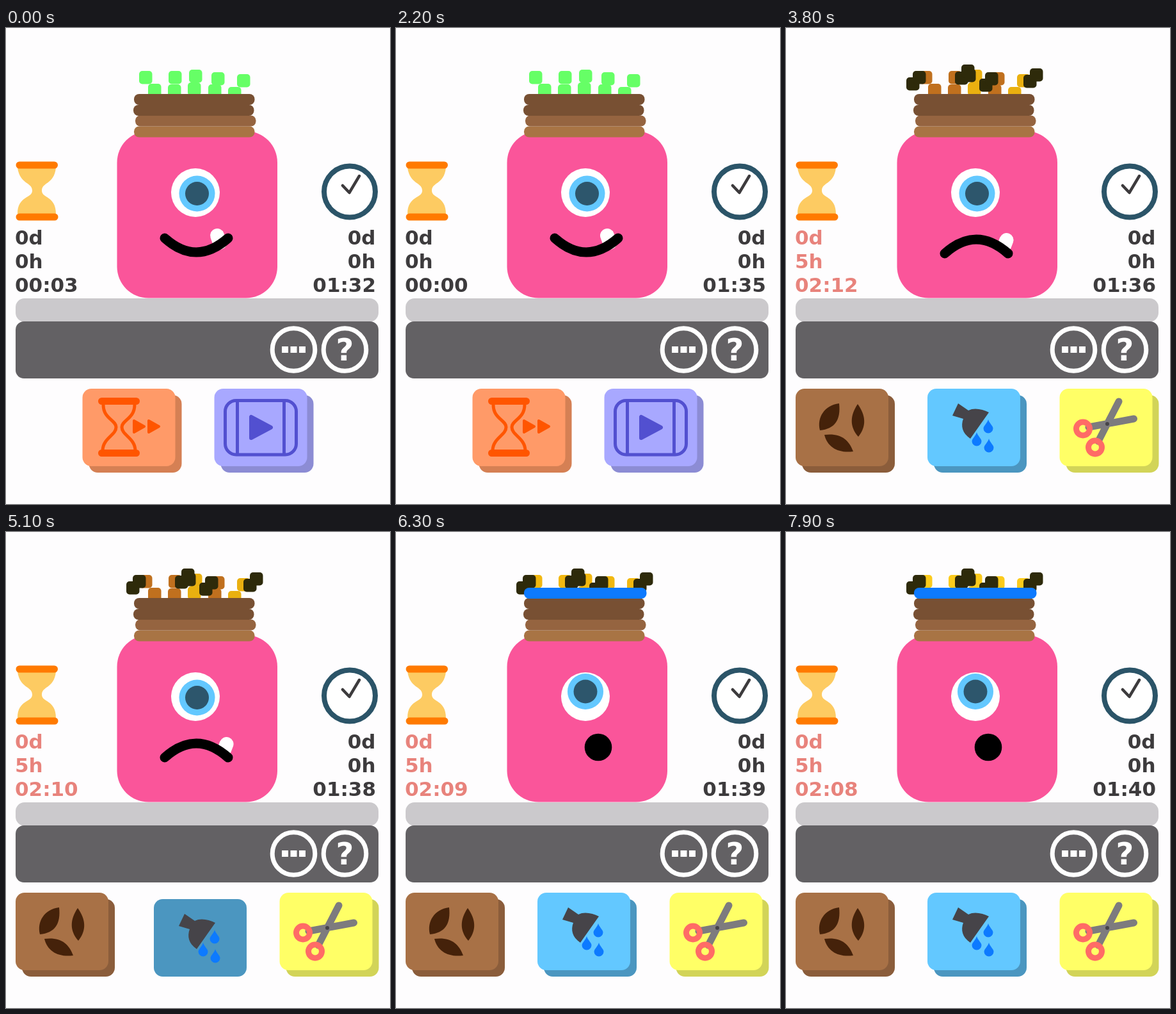
Write an HTML page that moves like this. It is 600 by 743 pixels and loops after 8000 ms.

```html
<!DOCTYPE html>
<html lang="en">
<head>
<meta charset="utf-8">
<title>Potted creature</title>
<style>
html, body { margin: 0; width: 100%; height: 100%; overflow: hidden; background: #fefdfe; }
svg { display: block; width: 100%; height: 100%; }
text { font: bold 31px "DejaVu Sans", sans-serif; fill: #3d3b3d; }
.line { fill: none; stroke-linecap: round; stroke-linejoin: round; }
</style>
</head>
<body>
<svg viewBox="0 0 600 743">
  <g id="plants"></g>
  <rect x="173.5" y="161" width="250.5" height="260.5" rx="49" fill="#fa559a"/>
  <g id="soil"></g>
  <rect id="water" x="200" y="87" width="191.5" height="17" rx="8" fill="#0d7aff"/>

  <circle cx="296" cy="257" r="38" fill="#fff"/>
  <g id="iris">
    <circle r="28" fill="#63c8ff"/>
    <circle r="18.5" fill="#2d566c"/>
  </g>
  <path id="tooth" class="line" stroke="#fff" stroke-width="22"/>
  <path id="mouth" class="line" stroke="#000" stroke-width="15"/>
  <circle id="gasp" cx="316" cy="336" r="21.3"/>

  <path fill="#fdcb62" d="M18 218C22 245 41 240 41 254C41 266 18 262 18 290H78C78 262 56 266 56 254C56 240 75 245 78 218Z"/>
  <path class="line" stroke="#ff7a00" stroke-width="11" d="M21 214H75.500M21 295H76"/>
  <circle cx="537" cy="255.500" r="40" fill="#fff" stroke="#2b5468" stroke-width="8"/>
  <path class="line" stroke="#3d3b3d" stroke-width="4.500" d="M526 246L536.500 257L552 231"/>
  <g id="left"><text x="14" y="338">0d</text><text x="14" y="375"></text><text x="14" y="412"></text></g>
  <g text-anchor="end">
    <text x="577.500" y="338">0d</text><text x="577.500" y="375">0h</text><text id="age" x="578" y="412"></text>
  </g>

  <rect x="15" y="422" width="567" height="36.500" rx="14" fill="#cbc9cc"/>
  <rect x="15" y="458" width="567" height="89" rx="13" fill="#636164"/>
  <g fill="none" stroke="#fff" stroke-width="7">
    <circle cx="449.500" cy="502" r="33.300"/>
    <circle cx="529.500" cy="502" r="33.300"/>
  </g>
  <path stroke="#fff" stroke-width="10" d="M431 502h10m3.500 0h10m3.500 0h10"/>
  <text x="529.500" y="519" text-anchor="middle" style="font-size:48px;fill:#fff">?</text>

  <g id="early">
    <g class="button" data-x="119.5" data-face="#ff9a68" data-shade="#d58054">
      <g class="line" stroke="#ff5500">
        <path stroke-width="11" d="M149.500 582.500H203.500M149.500 663.500H203.500"/>
        <path stroke-width="5" d="M152 588C152 610 172 612 172 623C172 636 151 640 151 660M201 588C201 610 181 612 181 623C181 636 202 640 202 660"/>
        <path stroke-width="4" fill="#ff5500" d="M200 613V631L216 622ZM223 613V631L239 622Z"/>
      </g>
    </g>
    <g class="button" data-x="325.5" data-face="#a8a8ff" data-shade="#8c8cd4">
      <g class="line" stroke="#5250d0" stroke-width="5">
        <rect x="342.500" y="581.500" width="111" height="84.500" rx="17"/>
        <path d="M361.500 582V665M434.500 582V665"/>
        <path fill="#5250d0" stroke-width="6" d="M383 607V640L414 623.500Z"/>
      </g>
    </g>
  </g>

  <g id="late">
    <g class="button" data-x="15" data-face="#a87146" data-shade="#8b5d3b">
      <path fill="#45220a" d="M83 586C60 589 48 608 53 628C76 626 86 612 83 586M112 587C125 605 126 622 113 638C99 622 100 605 112 587M60 635C85 632 98 642 105 661C82 664 65 655 60 635"/>
    </g>
    <g class="button" id="can" data-x="221" data-face="#63c8ff" data-shade="#4b96c0">
      <path fill="#464449" d="M269 586L285 597C294 592 307 595 317 600L288 641C275 632 273 621 277 610L260 605Z"/>
      <g id="drops" fill="#0d7aff"></g>
    </g>
    <g class="button" data-x="427.5" data-face="#ffff66" data-shade="#d2d458">
      <g class="line" stroke="#7d7b7e" stroke-width="11">
        <path d="M520 583L488 645M543.500 610L473 623"/>
        <g stroke="#ff6b66" stroke-width="9"><circle cx="464" cy="625.500" r="10.500"/><circle cx="483" cy="654.500" r="10.500"/></g>
      </g>
      <circle cx="502" cy="618" r="3" fill="#464449"/>
    </g>
  </g>
</svg>
<script>
const $ = id => document.getElementById(id);
const LOOP = 8000, WILT = 3100, STEP = 16.5;

function add(parent, name, attrs, first) {
  const el = document.createElementNS('http://www.w3.org/2000/svg', name);
  for (const key in attrs) el.setAttribute(key, attrs[key]);
  parent.insertBefore(el, first ? parent.firstChild : null);
  return el;
}
const block = ([x, y]) => add($('plants'), 'rect', { x, y, width: 20.5, height: 20.5, rx: 5 });
const show = (el, on) => { el.style.display = on ? '' : 'none'; };

// Stems: x, y, whether the wilted colour is yellow
const stems = [
  [208, 67, 0], [222, 87, 0], [254, 67, 0], [253, 88, 0], [286, 65, 1],
  [284, 85, 1], [321, 69, 0], [316, 88, 0], [361, 72, 1], [347, 92, 1]
].map(s => ({ el: block(s), yellow: s[2] }));

const dead = [
  [188, 77], [198, 67], [264, 68], [276, 64], [274, 57],
  [302, 79], [311, 69], [371, 73], [381, 63]
].map(block);
dead.forEach(el => el.setAttribute('fill', '#2e2a0a'));

const layers = [
  [200, 153.5, '#a87444'], [202, 136.5, '#956440'], [199, 120, '#785033'], [200, 103, '#785033']
].map(([x, y, fill]) => add($('soil'), 'rect', { x, y, width: 188.5, height: 17, rx: 8, fill }));

for (const [x, y] of [[316, 622], [298, 642], [317, 652]])
  add($('drops'), 'path', {
    transform: `translate(${x} ${y})`,
    d: 'M0-11C1-6 7.5-1 7.5 3A7.5 7.5 0 0 1-7.5 3C-7.5-1-1-6 0-11Z'
  });

document.querySelectorAll('.button').forEach(b => {
  const x = +b.dataset.x, size = { width: 145, height: 121, rx: 14 };
  b.face = add(b, 'rect', { x, y: 563, fill: b.dataset.face, ...size }, true);
  b.shadow = add(b, 'rect', { x: x + 10, y: 573, fill: b.dataset.shade, ...size }, true);
});

const moods = {
  happy: { mouth: 'M248 328Q297 372 347 328', tooth: 'M330 324L334 335' },
  sad: { mouth: 'M248 352Q297 308 347 352', tooth: 'M344.5 331L341 340' },
  flat: { mouth: 'M247.500 338H347.500', tooth: 'M330 324V335' }
};

function press(button, down) {
  button.setAttribute('transform', down ? 'translate(10 10)' : '');
  button.face.setAttribute('fill', down ? button.dataset.shade : button.dataset.face);
  show(button.shadow, !down);
}

const two = n => String(n).padStart(2, '0');
const clock = s => two(Math.floor(s / 60)) + ':' + two(s % 60);

function draw(t) {
  const wilted = t >= WILT, watered = t >= 5500;
  const sunk = t >= 6500 && t < 7300;
  const gasp = watered && !sunk;
  const age = 92 + Math.floor((t + 900) / 1000);

  $('age').textContent = clock(age);
  const [, hours, rest] = $('left').children;
  hours.textContent = wilted ? '5h' : '0h';
  rest.textContent = clock(wilted ? 228 - age : 95 - age);
  for (const el of $('left').children) el.style.fill = wilted ? '#e8837c' : '#3d3b3d';

  for (const { el, yellow } of stems)
    el.setAttribute('fill', !wilted ? '#66ff66' : t >= 7300 ? '#fccb1c'
      : watered ? '#f2b810' : yellow ? '#eab010' : '#c0701e');
  dead.forEach(el => show(el, wilted));

  const shift = `translate(0 ${sunk ? STEP : 0})`;
  $('plants').setAttribute('transform', shift);
  $('water').setAttribute('transform', shift);
  show($('water'), watered);
  show(layers[3], !sunk);

  const mood = moods[!wilted ? 'happy' : watered ? 'flat' : 'sad'];
  for (const part of ['mouth', 'tooth']) {
    $(part).setAttribute('d', mood[part]);
    show($(part), !gasp);
  }
  show($('gasp'), gasp);
  $('iris').setAttribute('transform', gasp ? 'translate(296 249)' : 'translate(298.500 258.500)');

  show($('early'), !wilted);
  show($('late'), wilted);
  press($('can'), (t >= 5000 && t < 5400) || (t >= 6800 && t < 7200));
}

const start = performance.now();
function frame() {
  draw((performance.now() - start) % LOOP);
  requestAnimationFrame(frame);
}
frame();
</script>
</body>
</html>
```
